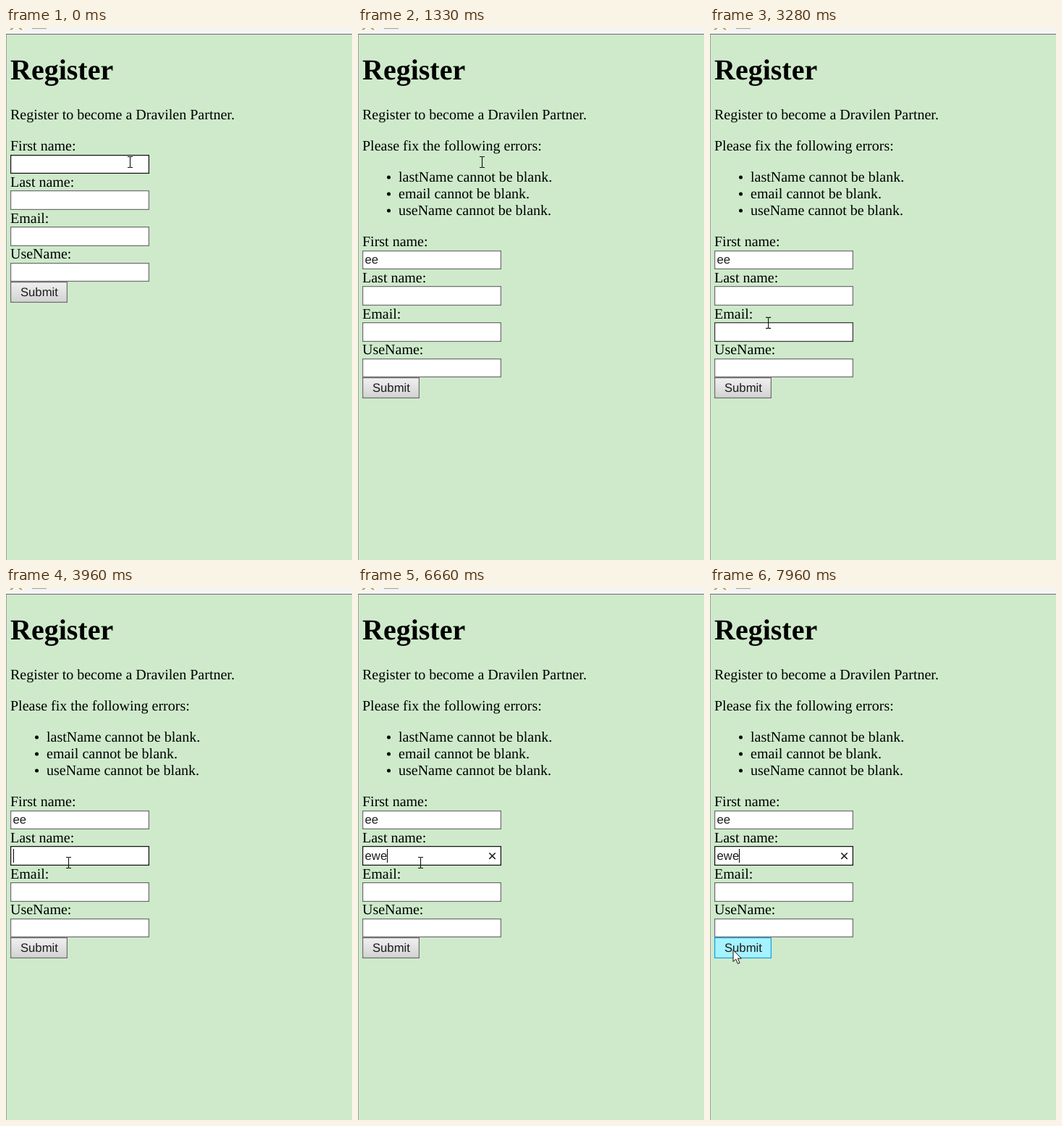
An HTML page that plays this animation: 478x734 px, repeating every 8 s.

```html
<!DOCTYPE html>
<html lang="en">
<head>
<meta charset="utf-8">
<title>Register</title>
<style>
  html, body { margin: 0; width: 100%; height: 100%; overflow: hidden; background: #ceeacb; }
  svg { display: block; width: 478px; height: 734px; }
  text { font: 20px "Liberation Serif", "Times New Roman", serif; text-rendering: geometricPrecision; white-space: pre; }
  text.title { font-size: 40px; font-weight: bold; }
  text.ui { font: 16.67px "Liberation Sans", Arial, sans-serif; fill: #1c1c1c; }
</style>
</head>
<body>
<svg id="stage" viewBox="0 0 478 734">
  <defs>
    <linearGradient id="face" x1="0" y1="0" x2="0" y2="1">
      <stop offset="0" stop-color="#f0f0f0"/>
      <stop offset="1" stop-color="#d2d2d2"/>
    </linearGradient>
  </defs>
  <rect width="478" height="734" fill="#ceeacb"/>
  <rect width="478" height="8" fill="#f5f5f5"/>
  <path d="M6 2.4L10 0M22 2.4L18 0" stroke="#c9a23f" stroke-width="2"/>
  <rect x="36" y="0" width="20" height="1.2" fill="#a9a9a9"/>
  <rect y="8" width="478" height="1" fill="#6f6f6f"/>
  <rect y="9" width="1" height="725" fill="#9da39c"/>
</svg>
<script>
const stage = document.getElementById("stage");
const LOOP = 8000;
const FAIL = 1330;      // the form is sent and comes back with errors
const REFOCUS = 3960;   // the second field is clicked
const SHIFT = 132;      // height of the error list
const PITCH = 49.7;     // distance between fields
const BUTTON_TOP = 350;
const DARK = "#141414", HOT = "#3a3a3a", GREY = "#707070";

function set(el, attrs) {
  for (const key in attrs) el.setAttribute(key, attrs[key]);
}
function add(parent, tag, attrs, content) {
  const el = document.createElementNS("http://www.w3.org/2000/svg", tag);
  set(el, attrs);
  if (content) el.textContent = content;
  parent.appendChild(el);
  return el;
}
function show(el, on) {
  el.setAttribute("visibility", on ? "visible" : "hidden");
}

add(stage, "text", { x: 6, y: 71, class: "title" }, "Register");
add(stage, "text", { x: 6, y: 126 }, "Register to become a Dravilen Partner.");

const errors = add(stage, "g", {});
add(errors, "text", { x: 6, y: 169 }, "Please fix the following errors:");
["lastName", "email", "useName"].forEach((name, i) => {
  const y = 212 + i * 23;
  add(errors, "circle", { cx: 42.5, cy: y - 6, r: 2.5 });
  add(errors, "text", { x: 56, y }, name + " cannot be blank.");
});

const form = add(stage, "g", {});
const fields = ["First name:", "Last name:", "Email:", "UseName:"].map((label, i) => {
  const top = Math.floor(175 + i * PITCH);
  const bottom = Math.ceil(200.8 + i * PITCH);
  const mid = (top + bottom) / 2;
  add(form, "text", { x: 6, y: Math.round(169.2 + i * PITCH) }, label);
  const box = add(form, "rect", {
    x: 6.6, y: top + 0.6, width: 190.8, height: bottom - top - 1.2,
    fill: "#fff", "stroke-width": 1.25
  });
  const text = add(form, "text", { x: 9.6, y: Math.floor(mid + 5.5), class: "ui" });
  const cross = add(form, "path", {
    d: `M181.3 ${mid - 4}l8.4 8.4m0 -8.4l-8.4 8.4`, stroke: "#1c1c1c", "stroke-width": 1.5
  });
  return { top, bottom, box, text, cross };
});
const button = add(form, "rect", {
  x: 6.6, y: BUTTON_TOP + 0.6, width: 77.8, height: 27.8, "stroke-width": 1.25
});
add(form, "text", { x: 20, y: 370, class: "ui" }, "Submit");

const caret = add(stage, "rect", { width: 1, height: 19, fill: "#000" });
const beam = add(stage, "path", {
  d: "M-3.5 -7.5H-1L0 -6.8L1 -7.5H3.5M0 -7V7M-3.5 7.5H-1L0 6.8L1 7.5H3.5",
  fill: "none", stroke: "#111", "stroke-width": 1.1
});
const arrow = add(stage, "path", {
  d: "M0 0V16L3.7 12.6L6.4 18.8L9 17.7L6.4 11.6H11.4Z",
  fill: "#fff", stroke: "#111", "stroke-width": 1, "stroke-linejoin": "round"
});

const KEY_GAP = 130;
const entries = [
  { word: "ee", start: 660, focus: -830 },
  { word: "ewe", start: 6400, focus: REFOCUS }
];
function typed({ word, start }, t) {
  return word.slice(0, Math.max(0, Math.floor((t - start) / KEY_GAP) + 1));
}
function textWidth(s) {
  return [...s].reduce((w, c) => w + (c === "w" ? 0.722 : 0.556) * 16.67, 0);
}

// The caret fades through one half-lit step and restarts after each key.
function caretLight({ word, start, focus }, t) {
  const lastKey = Math.min(t, start + (word.length - 1) * KEY_GAP);
  const age = t - (t < start ? focus : lastKey);
  const wave = 0.5 + 0.64 * Math.cos(2 * Math.PI * (age - 195) / 1090);
  return Math.min(1, Math.max(0, Math.round(wave * 2) / 2));
}

// The pointer moves in even ticks; each stop is [tick, x, y].
const glides = [
  { start: 2172, tick: 138, stops: [[0, 171.5, 185], [1, 123.5, 324], [3, 89, 456], [5, 67.5, 484.5], [9, 85, 381], [11, 86.5, 379]] },
  { start: 7190, tick: 128, stops: [[0, 86.5, 379], [4, 38, 483], [6, 32, 499.5]] }
];
function pointerAt(t) {
  const { start, tick, stops } = glides[t < glides[1].start ? 0 : 1];
  const last = stops[stops.length - 1];
  const k = Math.min(last[0], Math.max(0, Math.floor((t - start) / tick)));
  const i = Math.max(1, stops.findIndex(s => s[0] >= k));
  const [k0, x0, y0] = stops[i - 1], [k1, x1, y1] = stops[i];
  const u = (k - k0) / (k1 - k0);
  return [x0 + (x1 - x0) * u, y0 + (y1 - y0) * u];
}

function draw(t) {
  const failed = t >= FAIL;
  const shift = failed ? SHIFT : 0;
  const focus = !failed ? 0 : t >= REFOCUS ? 1 : -1;
  const [px, py] = pointerAt(t);
  const localY = py - shift;

  show(errors, failed);
  set(form, { transform: `translate(0 ${shift})` });
  fields.forEach((f, i) => {
    const value = entries[i] ? typed(entries[i], t) : "";
    const hover = localY > f.top && localY < f.bottom;
    f.text.textContent = value;
    set(f.box, { stroke: i === focus ? DARK : hover ? HOT : GREY });
    show(f.cross, i === focus && value);
  });

  const hot = localY > BUTTON_TOP + 1.5;
  set(button, { fill: hot ? "#a5f3ff" : "url(#face)", stroke: hot ? "#1f9fdc" : GREY });

  show(caret, focus >= 0);
  if (focus >= 0) {
    const entry = entries[focus];
    set(caret, {
      x: Math.floor(10 + textWidth(typed(entry, t))),
      y: fields[focus].top + shift + (focus ? 4 : 3),
      opacity: caretLight(entry, t)
    });
  }

  const pointing = localY > BUTTON_TOP + 0.5;
  show(beam, !pointing);
  show(arrow, pointing);
  set(pointing ? arrow : beam, { transform: `translate(${px} ${py})` });
}

function tick() {
  draw(performance.now() % LOOP);
  requestAnimationFrame(tick);
}
draw(0);
requestAnimationFrame(tick);
</script>
</body>
</html>
```
